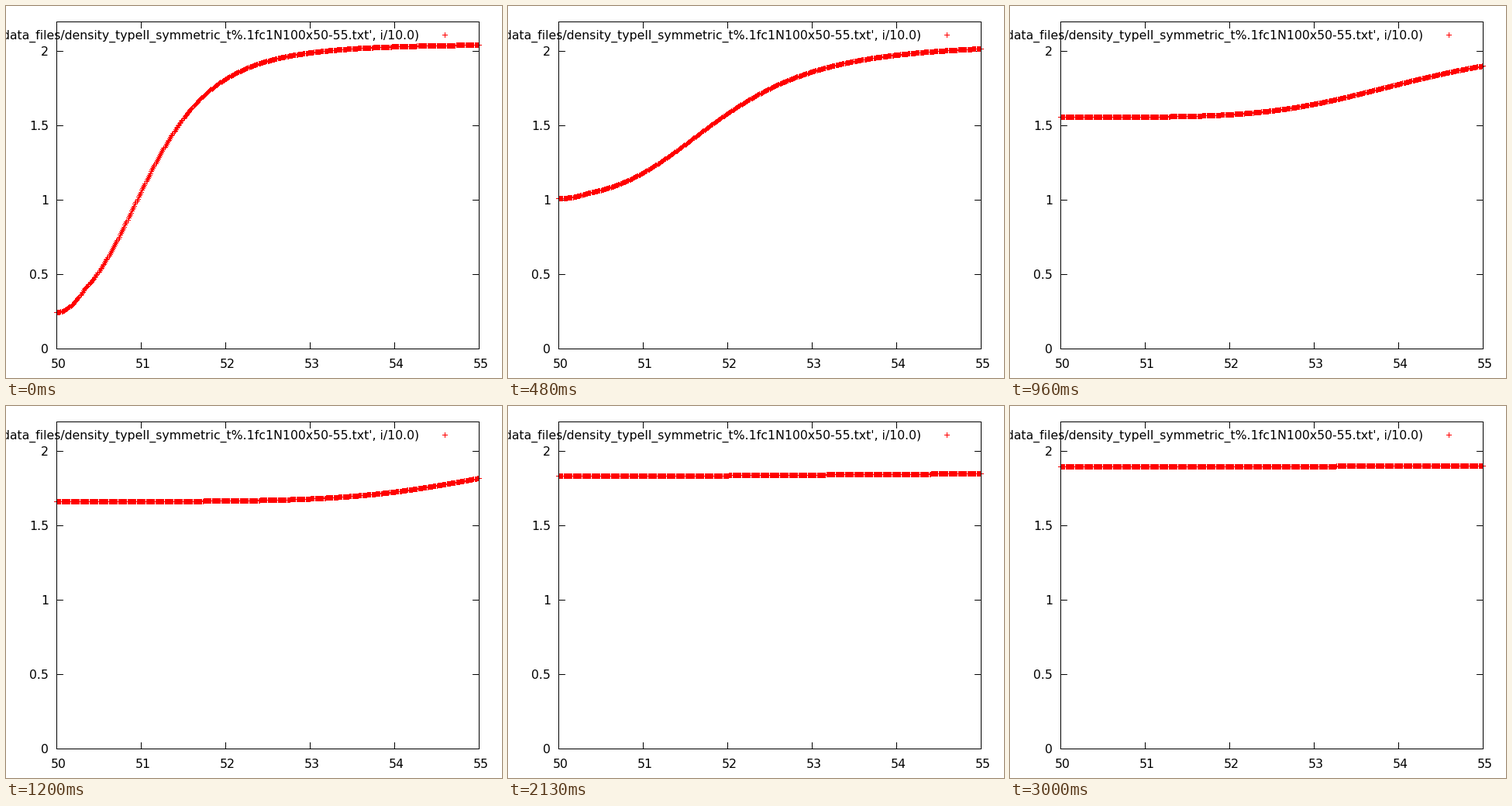
These frames come from a looping animation (640 by 480 pixels, 3.03 s). A matplotlib script:

```python
import numpy as np
import matplotlib.pyplot as plt
from matplotlib.animation import FuncAnimation
from matplotlib.collections import LineCollection

plt.rcParams["font.family"] = "DejaVu Sans"

W, H, DPI = 640, 480, 80
PX = 72 / DPI                                # one pixel in points
LEFT, RIGHT, TOP, BOTTOM = 65, 610, 20, 442
X_UNIT, Y_UNIT = 109, (BOTTOM - TOP) / 2.2
FRAMES, STEP = 101, 30
REST, DEPTH = 2.05, 1.805                    # far density, first depth of the dip

x = np.arange(501) / 100
x_px = np.floor(LEFT + X_UNIT * x + 0.5)


def ramp(t, start, soft=0.3):
    """Zero before start, then rising at unit speed, with a soft bend."""
    return soft * np.log1p(np.exp((t - start) / soft))


def density(t):
    """A dip that flattens like 1/t while its edge runs outward."""
    speed = 1.43 - 0.42 / (1 + (t / 1.6) ** 3.5)
    u = 0.82 * speed * max(t, 1e-3)
    depth = DEPTH * np.tanh(u) / u

    front = 1.07 + 1.5 * ramp(t, 1.12)
    r = np.maximum(x, 1e-6) / front
    bend = 0.6 * np.exp(-(t / 2.7) ** 6)
    power = 2.7 + 1.3 * ramp(t, 1.65) + bend * np.log(r)
    edge = 1 / (1 + r ** np.maximum(power, 2))

    late = 1 - np.exp(-(t / 5) ** 6)
    tilt = 1 - 0.1 * late * (1 - np.exp(-(r / 0.4) ** 2))
    return REST - depth * edge * tilt


def pluses(px, py, r=3.5):
    cx, cy = np.atleast_1d(px) + 0.5, np.atleast_1d(py) + 0.5
    across = np.stack([np.c_[cx - r, cy], np.c_[cx + r, cy]], axis=1)
    down = np.stack([np.c_[cx, cy - r], np.c_[cx, cy + r]], axis=1)
    return np.concatenate([across, down])


def curve(t):
    return pluses(x_px, BOTTOM - np.floor(Y_UNIT * density(t) + 0.5))


fig = plt.figure(figsize=(W / DPI, H / DPI), dpi=DPI, facecolor="white")
ax = fig.add_axes([0, 0, 1, 1])
ax.set(xlim=(0, W), ylim=(H, 0))
ax.axis("off")


def add_lines(segments, color, z):
    lines = LineCollection(segments, colors=color, linewidths=PX,
                           antialiaseds=False, snap=False, zorder=z)
    ax.add_collection(lines, autolim=False)
    return lines


def label(px, py, text, ha):
    ax.text(px, py, text, ha=ha, va="baseline", fontsize=15.8 * PX, color="black")


def seg(x0, y0, x1, y1):
    """Segment covering whole pixels, both ends included."""
    dx, dy = (0.5, 0) if y0 == y1 else (0, 0.5)
    return [(x0 + 0.5 - dx, y0 + 0.5 - dy), (x1 + 0.5 + dx, y1 + 0.5 + dy)]


border = [seg(LEFT, TOP, RIGHT, TOP), seg(LEFT, BOTTOM, RIGHT, BOTTOM),
          seg(LEFT, TOP, LEFT, BOTTOM), seg(RIGHT, TOP, RIGHT, BOTTOM)]
ticks = []
for n in range(6):
    tx = LEFT + X_UNIT * n
    ticks += [seg(tx, TOP, tx, TOP + 8), seg(tx, BOTTOM - 8, tx, BOTTOM)]
    label(tx + 3, 467, str(50 + n), "center")
for n in range(5):
    ty = BOTTOM - 96 * n
    ticks += [seg(LEFT, ty, LEFT + 8, ty), seg(RIGHT - 8, ty, RIGHT, ty)]
    label(55, ty + 6, f"{n / 2:g}", "right")

label(533, 43, "data_files/density_typeII_symmetric_t%.1f"
      "c1N100x50-55.txt', i/10.0)", "right")
add_lines(ticks, "black", 1)
add_lines(pluses(566, 37), "red", 2)
points = add_lines(curve(0), "red", 2)
add_lines(border, "black", 3)


def update(i):
    points.set_segments(curve(i / 10))
    return [points]


anim = FuncAnimation(fig, update, frames=FRAMES, interval=STEP,
                     repeat=True, repeat_delay=0)
plt.show()
```
